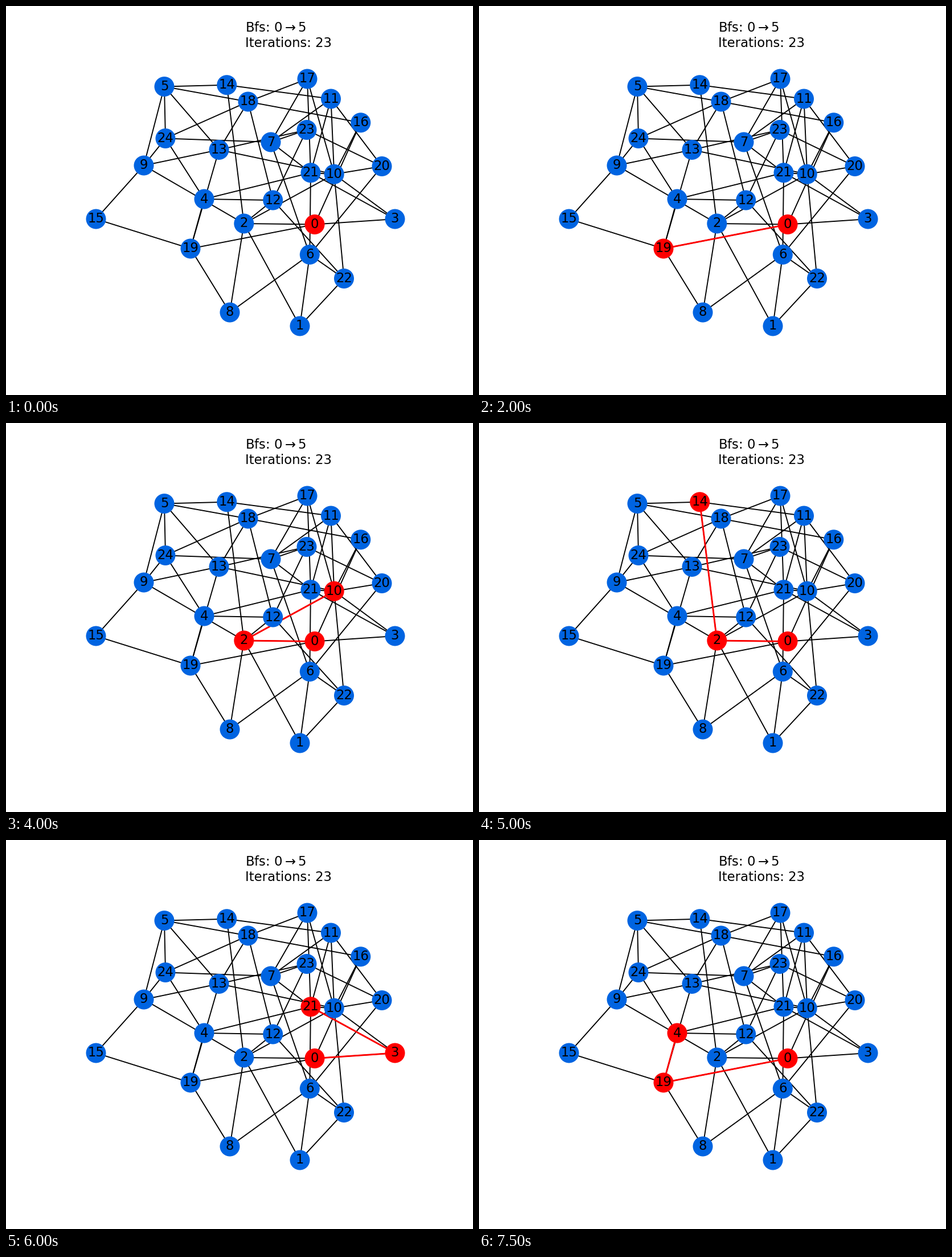
A matplotlib script for the animation above (8 s loop, 820 px wide and 683 px high).

```python
from itertools import islice

import matplotlib.pyplot as plt
from matplotlib.animation import FuncAnimation
from matplotlib.collections import LineCollection

W, H, DPI = 820, 683, 64
PT = 72 / DPI  # points per pixel
STEPS, STEP_MS = 16, 500
BLUE, RED = "#0064e1", "#ff0000"
START, GOAL = 0, 5
FONT = {"family": "DejaVu Sans", "size": 22.78 * PT, "color": "black"}

POS = [
    (542, 383.5), (516, 562), (417.8, 382), (683, 374), (348, 339),
    (278, 141.5), (533.3, 436.5), (465, 239), (393, 538), (242, 280),
    (576.2, 295.3), (570.5, 163), (468.7, 341), (374, 252.5), (387.7, 138.7),
    (158, 374), (622.8, 204.8), (529, 128), (425, 168), (324, 426),
    (660, 281.5), (535, 292.8), (593.5, 478.5), (528, 217.5), (280, 232.5),
]

LINKS = {
    0: [2, 3, 16, 19],
    1: [2, 6, 22],
    2: [8, 9, 10, 12, 14],
    3: [10, 21],
    4: [12, 19, 21, 24],
    5: [9, 13, 14, 18, 24],
    6: [7, 8, 20, 21, 22],
    7: [11, 17, 21, 23, 24],
    8: [19],
    9: [13, 15, 24],
    10: [11, 13, 16, 17, 20, 21, 22],
    11: [14, 20, 21],
    12: [18, 22, 23],
    13: [18, 19, 23],
    15: [19],
    16: [18],
    17: [18, 21],
    18: [24],
    20: [23],
}
EDGES = [(a, b) for a, ends in LINKS.items() for b in ends]


def neighbours(node):
    return sorted([b for a, b in EDGES if a == node]
                  + [a for a, b in EDGES if b == node])


def bfs_paths(start):
    """Yield simple paths in breadth-first order."""
    queue = [[start]]
    while queue:
        path = queue.pop(0)
        yield path
        queue += [path + [n] for n in neighbours(path[-1]) if n not in path]


def segments(pairs):
    return [(POS[a], POS[b]) for a, b in pairs]


PATHS = list(islice(bfs_paths(START), STEPS))

fig = plt.figure(figsize=(W / DPI, H / DPI), dpi=DPI, facecolor="white")
ax = fig.add_axes([0, 0, 1, 1])
ax.set_xlim(0, W)
ax.set_ylim(H, 0)
ax.axis("off")

ax.add_collection(LineCollection(segments(EDGES), colors="black",
                                 linewidths=1.9 * PT, zorder=1))
trail = LineCollection([], colors=RED, linewidths=2.85 * PT, zorder=2)
ax.add_collection(trail)
nodes = ax.scatter(*zip(*POS), s=(35 * PT) ** 2, c=[BLUE] * len(POS),
                   linewidths=0, zorder=3)
for i, (x, y) in enumerate(POS):
    ax.text(x, y, str(i), ha="center", va="center", zorder=4, **FONT)
ax.text(420, 71.5, rf"Bfs: ${START}\rightarrow{GOAL}$" + "\nIterations: 23",
        ha="left", va="baseline", **FONT)


def update(step):
    path = PATHS[step]
    trail.set_segments(segments(zip(path, path[1:])))
    nodes.set_facecolor([RED if n in path else BLUE for n in range(len(POS))])
    return trail, nodes


anim = FuncAnimation(fig, update, frames=STEPS, interval=STEP_MS,
                     repeat=True, repeat_delay=0, blit=False)
plt.show()
```
